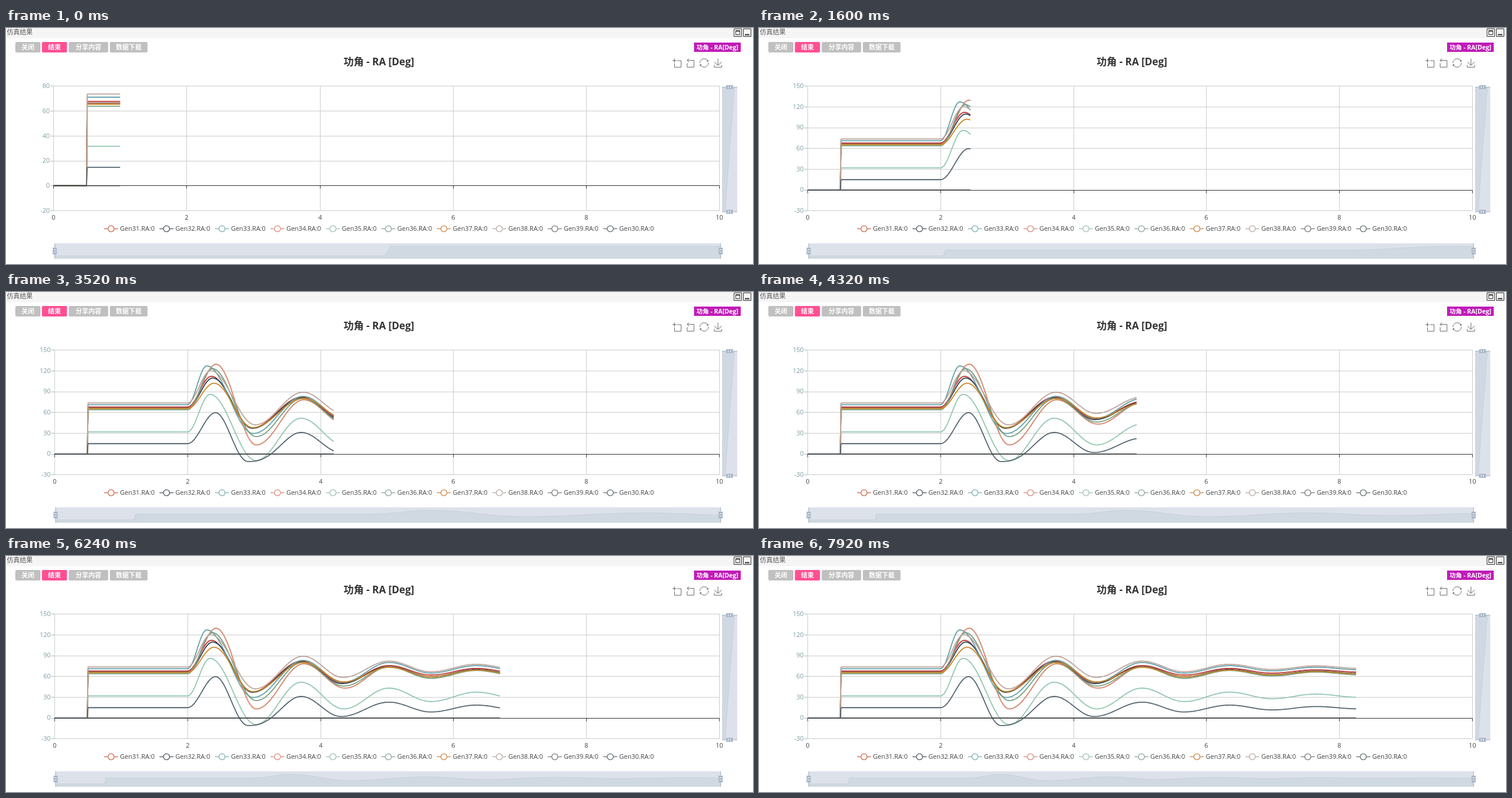
Animation of 1280x405 px, one loop 8000 ms. Source, as an HTML page:

```html
<!DOCTYPE html>
<html lang="zh">
<head>
<meta charset="utf-8">
<title>仿真结果</title>
<style>
html, body { margin: 0; width: 100%; height: 100%; overflow: hidden; background: #fff; }
svg { display: block; width: 1280px; height: 405px; }
text { font: 11px "Open Sans", "Noto Sans CJK SC", "Noto Sans CJK", sans-serif; fill: #444; }
.button { font-weight: bold; fill: #fff; text-anchor: middle; }
.title { font-size: 17.3px; font-weight: bold; fill: #333; text-anchor: middle; }
.xlabel { text-anchor: middle; }
.ylabel { text-anchor: end; fill: #7b9ba5; }
.grid { stroke: #ccc; fill: none; }
.axis { stroke: #333; fill: none; }
.series { fill: none; stroke-width: 1.8; stroke-linejoin: bevel; }
.icon { fill: none; stroke: #666; }
.icon path { vector-effect: non-scaling-stroke; }
.range { fill: #dce1ea; }
.shadow { fill: #d0d8e2; }
.shadowline { fill: none; stroke: #c3ced9; stroke-width: .8; }
.handle { fill: #a7b7c8; }
.handleline { stroke: #a7b7c8; stroke-width: 1.2; }
.grip { stroke: #fff; fill: none; stroke-width: 1; }
</style>
</head>
<body>
<svg viewBox="0 0 1280 405" xmlns="http://www.w3.org/2000/svg">
  <rect width="1280" height="17.5" fill="#f5f5f5"/>
  <text x="1.5" y="11" style="fill:#555">仿真结果</text>
  <g fill="none" stroke="#333">
    <path d="M1247.5 1.5h13v13h-13zM1263.5 1.5h13v13h-13z"/>
    <path d="M1250.5 4.5h7v7h-7z"/>
    <path d="M1250 5h8M1266 11.5h8" stroke-width="2"/>
  </g>
  <g id="buttons"></g>
  <rect x="1179" y="25" width="80" height="16" fill="#c01cb8"/>
  <text x="1219" y="37" class="button" style="font-size:10.6px">功角 - RA[Deg]</text>
  <text x="639" y="64" class="title">功角 - RA [Deg]</text>
  <g class="icon">
    <path transform="translate(1142 52.5) scale(.255)" d="M0,13.5h26.9M13.5,26.9V0M32.1,13.5H58V58H13.5V32.1"/>
    <path transform="translate(1164.5 52) scale(.262)" d="M22,1.4L9.9,13.5l12.3,12.3M10.3,13.5H54.9v44.6H10.3v-26"/>
    <path transform="translate(1188.5 52.3) scale(.258)" d="M47,18.9h9.8V8.7M56.3,20.1C52.1,9,40.5,.6,26.8,2.1C12.6,3.7,1.6,16.2,2.1,30.6M13,41.1H3.1v10.2M3.7,39.9c4.2,11.1,15.8,19.5,29.5,18c14.2-1.6,25.2-14.1,24.7-28.5"/>
    <path transform="translate(1212.5 52.5) scale(.255)" d="M4.7,22.9L29.3,45.5L54.7,23.4M4.6,43.6V58H53.8V43.6M29.2,45.1V0"/>
  </g>
  <g id="chart"></g>
  <g id="legend"></g>
</svg>
<script>
const LOOP = 8000, TICK = 80, RATE = 7.25 / 99;
const TOP = 99.5, BOTTOM = 313.5, RIGHT = 1222.5;
const FAULT = 2, LATE_TIMES = [5.03, 5.66, 6.345, 6.985, 7.645, 8.3], DECAY = 0.7;

// swings: first peak, trough, peak, trough as [time, value, skew]; then a decay around `rest`
const series = [
  { id: 31, color: '#c23531', key: '#cf6450', start: 67.7, swings: [[2.36, 112], [2.97, 37.5], [3.72, 82], [4.33, 51]], rest: 67.5, amp: 8 },
  { id: 32, color: '#2f4554', key: '#4c5a5c', start: 66.4, swings: [[2.38, 109.5], [2.98, 37], [3.72, 81], [4.32, 49.5]], rest: 65.6, amp: 8.6 },
  { id: 33, color: '#61a0a8', key: '#80aeb0', start: 71, swings: [[2.29, 127], [2.99, 29.5], [3.74, 83], [4.34, 51.5]], rest: 71, amp: 9 },
  { id: 34, color: '#d48265', key: '#d98c7c', start: 66, swings: [[2.43, 129.5], [3.035, 13], [3.75, 78], [4.37, 43]], rest: 64.3, amp: 9.5 },
  { id: 35, color: '#91c7ae', key: '#a0c2b8', start: 31.7, swings: [[2.34, 86], [3.03, -9.5], [3.71, 51.5], [4.35, 13]], rest: 31.6, amp: 11.4 },
  { id: 36, color: '#749f83', key: '#8ca39e', start: 63.7, swings: [[2.375, 123], [3.035, 25], [3.73, 80], [4.35, 46]], rest: 63.8, amp: 9.5 },
  { id: 37, color: '#ca8622', key: '#cc8848', start: 65.4, swings: [[2.4, 102], [2.98, 38], [3.75, 80], [4.35, 52]], rest: 65, amp: 8 },
  { id: 38, color: '#bda29a', key: '#b9aaa8', start: 73.5, swings: [[2.35, 120], [3.02, 42], [3.74, 89], [4.34, 58.5]], rest: 73, amp: 9 },
  { id: 39, color: '#6e7074', key: '#7a7a7c', start: 0, swings: [], rest: 0, amp: 0 },
  { id: 30, color: '#546570', key: '#667074', start: 14.8, swings: [[2.425, 59.5], [2.91, -11, 0.96], [3.71, 31, 1.28], [4.31, 2]], rest: 14.4, amp: 8.3 }
];

for (const s of series) {
  const late = LATE_TIMES.map((t, k) => [t, s.rest + s.amp * (-DECAY) ** k]);
  s.knots = [[FAULT, s.start], ...s.swings, ...late];
}

function valueAt(s, t) {
  if (t <= 0.495) return 0;
  if (t < 0.505) return s.start * (t - 0.495) / 0.01;
  if (t <= FAULT) return s.start;
  const i = s.knots.findIndex(k => k[0] >= t);
  const [t0, v0] = s.knots[i - 1], [t1, v1, skew = 1] = s.knots[i];
  const f = ((t - t0) / (t1 - t0)) ** skew;
  return v0 + (v1 - v0) * (1 - Math.cos(Math.PI * f)) / 2;
}

function sampleTimes(end) {
  const times = [0, 0.495, 0.505];
  for (let t = FAULT; t < end; t += 0.015) times.push(t);
  return [...times, end];
}

const line = pts => 'M' + pts.map(p => p.map(n => n.toFixed(2)).join(' ')).join('L');
const path = (cls, d, extra = '') => `<path class="${cls}" d="${d}" ${extra}/>`;
const label = (cls, x, y, str) => `<text class="${cls}" x="${x}" y="${y}">${str}</text>`;
const rect = (cls, x, y, w, h) => `<rect class="${cls}" x="${x}" y="${y}" width="${w}" height="${h}"/>`;
const snap = v => Math.floor(v + 0.25) + 0.5;

function gridMarkup(left, x, y, low, high, step) {
  let out = '', labels = '', ticks = '';
  for (let v = low; v <= high; v += step) {
    const py = snap(y(v));
    out += path('grid', `M${left} ${py}H${RIGHT}`);
    ticks += `M${left - 5} ${py}h5`;
    labels += label('ylabel', left - 6.5, y(v) + 3.5, v);
  }
  out += path('grid', ticks, 'style="stroke:#aab8be"');
  const zero = snap(y(0));
  let axis = `M${left} ${zero}H${RIGHT}`;
  for (let t = 0; t <= 10; t += 2) {
    const px = snap(x(t));
    out += path('grid', `M${px} ${TOP}V${BOTTOM}`);
    axis += `M${px} ${zero}v5`;
    labels += label('xlabel', px, 328.5, t);
  }
  return { grid: out + labels, axis: path('axis', axis) };
}

function bottomSlider(left, end, times) {
  const right = 1224.5, top = 369.5, height = 26.5;
  const values = times.map(t => valueAt(series[0], t)), max = Math.max(...values);
  const pts = times.map((t, i) => [
    left + (right - left) * t / end,
    top + height * (1.3 - values[i] / max) / 1.6
  ]);
  const d = line(pts);
  const handle = x => path('handleline', `M${x} ${top}v${height}`) +
    rect('handle', x - 3.5, 377, 7, 11.5) +
    path('grip', `M${x - 2} 380.5h4M${x - 2} 384.5h4`);
  return rect('range', left, top, right - left, height) +
    path('shadow', `${d}V${top + height}H${left}Z`) + path('shadowline', d) +
    handle(left) + handle(right);
}

function sideSlider() {
  const handle = y => path('handleline', `M1227 ${y}h26`) +
    rect('handle', 1234, y - 3.5, 11.5, 7) +
    path('grip', `M1237.5 ${y - 2}v4M1241.5 ${y - 2}v4`);
  return rect('range', 1227, 101, 26, 214) +
    path('shadow', 'M1227 101H1248L1232 315H1227Z') +
    path('shadowline', 'M1248 101L1232 315') +
    handle(101.5) + handle(315.5);
}

function chartMarkup(ms) {
  const now = 1 + RATE * Math.floor(ms / TICK);
  const end = Math.floor(now * 20 + 1e-6) / 20;
  const times = sampleTimes(end);
  const peak = Math.max(...series.flatMap(s => times.map(t => valueAt(s, t))));
  const step = peak < 125 ? 20 : 30, low = -step, high = Math.ceil(peak / step) * step;
  const left = high < 100 ? 81.5 : 83;
  const x = t => left + (RIGHT - left) * t / 10;
  const y = v => BOTTOM - (BOTTOM - TOP) * (v - low) / (high - low);
  const { grid, axis } = gridMarkup(left, x, y, low, high, step);
  const curves = series.map(s =>
    path('series', line(times.map(t => [x(t), y(valueAt(s, t))])), `stroke="${s.color}"`)).join('');
  return grid + curves + axis + sideSlider() + bottomSlider(left + 2, end, times);
}

const byId = id => document.getElementById(id);

byId('buttons').innerHTML = [
  [16, 43, '关闭'], [61.5, 43, '结束', '#ff4f93'], [107.5, 67.5, '分享内容'], [178, 64.5, '数据下载']
].map(([x, w, str, fill = '#c0c0c0']) =>
  `<rect x="${x}" y="24" width="${w}" height="18" rx="2" fill="${fill}"/>` +
  label('button', x + w / 2, 37, str)).join('');

byId('legend').innerHTML = series.map((s, i) => {
  const cx = 180 + 95.05 * i;
  return `<g stroke="${s.key}" stroke-width="1.3" fill="#fff">` +
    `<path d="M${cx - 12} 344.5h24"/><circle cx="${cx}" cy="344.5" r="5.2"/></g>` +
    label('', cx + 15.3, 348, `Gen${s.id}.RA:0`);
}).join('');

const chart = byId('chart');
let shown = -1;
function draw(now) {
  const tick = Math.floor((now % LOOP) / TICK);
  if (tick !== shown) {
    shown = tick;
    chart.innerHTML = chartMarkup(tick * TICK);
  }
  requestAnimationFrame(draw);
}
draw(0);
</script>
</body>
</html>
```
